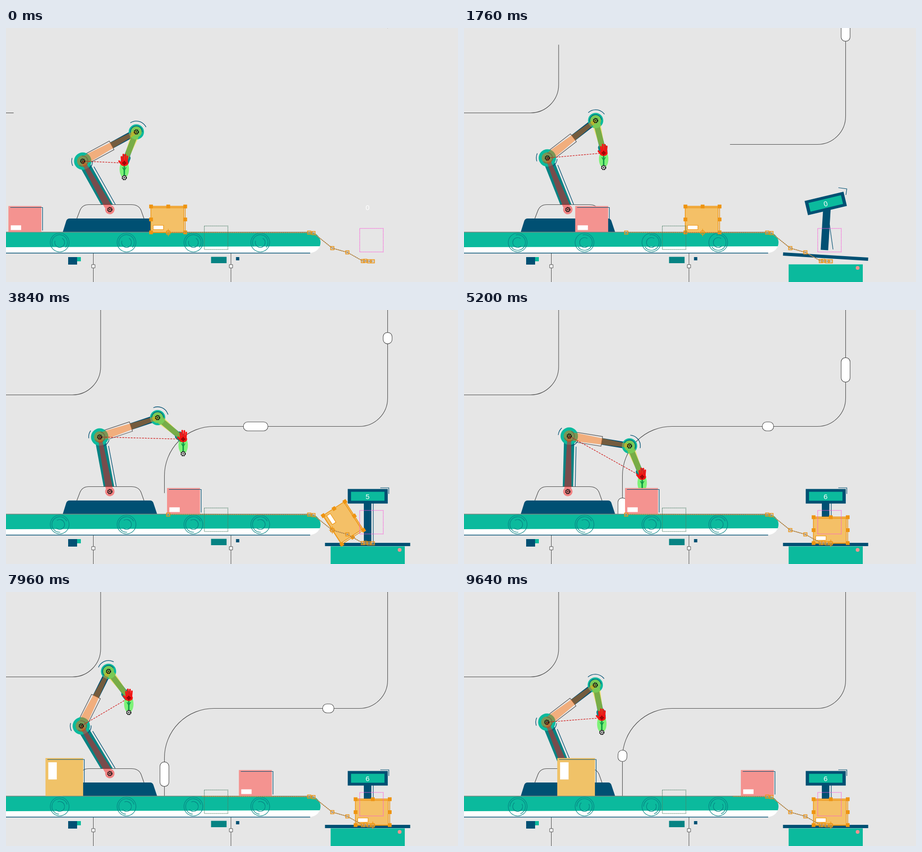
Animation of 960 by 540 pixels, one loop 9680 ms. Source, as an HTML page with a canvas:

```html
<!DOCTYPE html>
<html lang="en">
<head>
<meta charset="utf-8">
<title>Conveyor</title>
<style>
  html, body { margin: 0; width: 100%; height: 100%; overflow: hidden; background: #e6e6e6; }
  canvas { display: block; }
</style>
</head>
<body>
<canvas id="stage" width="960" height="540"></canvas>
<script>
const LOOP = 9680;
const c = document.getElementById('stage').getContext('2d');
const BG = '#e6e6e6', GREEN = '#0bba9d', TEAL = '#078383', NAVY = '#005073',
      PINK = '#f49390', YELLOW = '#f0c268', ORANGE = '#ee9411', INK = '#4a4a4a';
const RAD = Math.PI / 180, TAU = Math.PI * 2;

// ---- timing ----
const clamp = (v, a, b) => Math.max(a, Math.min(b, v));

function track(t, T, V, eased = true) {
  const n = T.length - 1;
  if (t <= T[0]) return V[0];
  if (t >= T[n]) return V[n];
  const i = T.findIndex(k => k > t) - 1, h = T[i + 1] - T[i], u = (t - T[i]) / h;
  if (!eased) return V[i] + (V[i + 1] - V[i]) * u;
  const slope = k => (V[k + 1] - V[k]) / (T[k + 1] - T[k]);
  const tangent = k => {
    if (k < 1 || k >= n) return 0;
    const a = slope(k - 1), b = slope(k);
    return a * b <= 0 ? 0 : 2 * a * b / (a + b);
  };
  const u2 = u * u, u3 = u2 * u;
  return (2 * u3 - 3 * u2 + 1) * V[i] + (u3 - 2 * u2 + u) * h * tangent(i)
       + (3 * u2 - 2 * u3) * V[i + 1] + (u3 - u2) * h * tangent(i + 1);
}

// ---- drawing helpers ----
function rect(x, y, w, h, fill) { c.fillStyle = fill; c.fillRect(x, y, w, h); }

function paint(fill, stroke, width = 1) {
  if (fill) { c.fillStyle = fill; c.fill(); }
  if (stroke) { c.strokeStyle = stroke; c.lineWidth = width; c.stroke(); }
}

function poly(points, stroke, width = 1, dash = []) {
  c.beginPath();
  points.forEach(p => c.lineTo(p[0], p[1]));
  c.setLineDash(dash);
  paint(null, stroke, width);
  c.setLineDash([]);
}

function arc(x, y, r, from, to, stroke, width = 1.2) {
  c.beginPath();
  c.arc(x, y, r, from * RAD, to * RAD);
  paint(null, stroke, width);
}

function disc(x, y, r, fill) {
  c.beginPath();
  c.arc(x, y, r, 0, TAU);
  paint(fill);
}

function local(x, y, deg, draw) {
  c.save();
  c.translate(x, y);
  c.rotate(deg * RAD);
  draw();
  c.restore();
}

const polar = (p, deg, r) => [p[0] + r * Math.cos(deg * RAD), p[1] + r * Math.sin(deg * RAD)];

// ---- pipes ----
const leftPipe = new Path2D('M0 180.5H141A60 60 0 0 0 201 120V0');
const rightPipe = new Path2D('M810.5 0V187.5A60 60 0 0 1 750.5 247.5H441.5A105 105 0 0 0 336.5 352.5V434');

function pipePoint(s) {
  if (s < 187.5) return [810.5, s, 90];
  if (s < 281.7) {
    const a = (s - 187.5) / 60 / RAD;
    return [...polar([750.5, 187.5], a, 60), a + 90];
  }
  if (s < 590.7) return [750.5 - (s - 281.7), 247.5, 180];
  if (s < 755.7) {
    const a = -90 - (s - 590.7) / 105 / RAD;
    return [...polar([441.5, 352.5], a, 105), a + 90];
  }
  return [336.5, 352.5 + s - 755.7, 90];
}

function pipes(t) {
  c.strokeStyle = INK;
  c.lineWidth = 1.1;
  const grow = (path, length) => {
    c.setLineDash([Math.max(0, length), 2000]);
    c.stroke(path);
    c.setLineDash([]);
  };
  const k = Math.min(t, 3900);
  grow(leftPipe, 16 + .222 * k - 2.8e-5 * k * k);
  const m = Math.min(t, 5500);
  grow(rightPipe, .3153 * m - 2.84e-5 * m * m);

  [1752, 3592, 4671, 6514].forEach((start, i) => {
    const s = (t - start) * .2403, w = i % 2 ? 24 : 52;
    if (s < -30 || s > 870) return;
    const [x, y, a] = pipePoint(s);
    local(x, y, a, () => {
      c.beginPath();
      c.roundRect(-w / 2, -9.5, w, 19, 9);
      paint('#fff', INK, 1.1);
    });
  });
}

// ---- conveyor ----
function conveyor(t) {
  c.save();
  c.beginPath();
  c.moveTo(0, 434);
  c.lineTo(646, 434);
  c.arc(646, 456, 22, -Math.PI / 2, Math.PI / 2);
  c.lineTo(0, 478);
  c.clip();
  rect(0, 434, 670, 45, '#fff');
  c.beginPath();
  c.moveTo(0, 434);
  c.lineTo(670, 434);
  c.lineTo(670, 464);
  c.lineTo(0, 466);
  paint(GREEN);
  c.restore();
  poly([[0, 434], [652, 434]], '#788880', 1.4);
  poly([[0, 478.5], [646, 478.5]], NAVY, 1.3);

  const spin = t * .0923 / 20 / RAD;
  for (let x = 114; x < 600; x += 142) {
    arc(x, 456, 20, 0, 360, TEAL);
    arc(x, 456, 16.5, spin + 150, spin + 400, TEAL);
    arc(x, 456, 10.5, spin - 60, spin + 200, TEAL);
  }

  rect(132, 487, 19, 16, NAVY);
  rect(151, 487, 8, 9, GREEN);
  rect(435.5, 486.5, 33, 13.5, TEAL);
  rect(488.5, 487, 7, 7, NAVY);
  [185.5, 477.8].forEach(x => {
    poly([[x, 479], [x, 540]], INK);
    c.beginPath();
    c.rect(x - 3.5, 503, 7, 7);
    paint('#fff', INK);
  });
}

// ---- robot arm ----
const POSE = [0, 1760, 3840, 5200, 6680, 7960, 9640];
const LOWER = [-119.2, -111.6, -100.5, -88.5, -104.5, -120.9, -112.2];
const UPPER = [-28.6, -37.8, -18.5, 9.3, -27.4, -63.5, -37.5];
const FORE = [111.1, 76.1, 40.1, 67.8, 63.3, 52.7, 78.7];

function bone(p, deg, len, r0, r1, fill) {
  local(...p, deg, () => {
    c.beginPath();
    c.arc(0, 0, r0, Math.PI / 2, Math.PI * 1.5);
    c.arc(0, 0, r0, -Math.PI / 2, -Math.PI / 4);
    c.lineTo(r0, -r0 * .75);
    c.lineTo(len, -r1);
    c.lineTo(len, r1);
    c.lineTo(r0, r0 * .75);
    c.arc(0, 0, r0, Math.PI / 4, Math.PI / 2);
    paint(fill);
  });
}

function marker([x, y], hollow) {
  if (hollow) disc(x, y, 5, '#fff');
  c.setLineDash([2.6, .8]);
  arc(x, y, 4.2, 0, 360, '#111', 2.6);
  c.setLineDash([]);
  disc(x, y, 1.4, '#111');
}

function hand([x, y]) {
  c.beginPath();
  c.ellipse(x, y + 13, 10, 18.5, 0, 0, TAU);
  paint('rgba(40,252,30,.55)');
  poly([[x, y + 6], [x, y + 30]], '#0c9a45', 3);
  poly([[x - 4, y + 9], [x, y + 16], [x + 4, y + 9]], '#0c9a45', 1.5);
  c.lineCap = 'round';
  [[-6, -13], [-2, -18], [2.5, -17.5], [6.5, -14]].forEach(([dx, dy]) =>
    poly([[x + dx * .8, y], [x + dx, y + dy]], '#f51414', 3.6));
  poly([[x - 5, y + 3], [x - 11, y - 4]], '#f51414', 3.6);
  c.lineCap = 'butt';
  c.beginPath();
  c.ellipse(x, y, 8.5, 6.5, 0, 0, TAU);
  paint('#f51414');
  arc(x, y, 3, 0, 360, '#600', 1);
  poly([[x - 5, y], [x + 5, y]], '#600');
  poly([[x, y - 5], [x, y + 5]], '#600');
}

function arm(t) {
  const a1 = track(t, POSE, LOWER), a2 = track(t, POSE, UPPER), a3 = track(t, POSE, FORE);
  const base = [220.5, 386], elbow = polar(base, a1, 118),
        top = polar(elbow, a2, 129.7), wrist = polar(top, a3, 71);

  local(...elbow, a1 + 180, () => {
    rect(0, -11, 112, 22, TEAL);
    poly([[22, -15], [114, -15.5]], NAVY, 1.3);
  });

  // housing
  c.beginPath();
  c.moveTo(150.5, 405);
  c.lineTo(157, 388);
  c.quadraticCurveTo(162, 375.5, 176, 375.5);
  c.lineTo(266, 375.5);
  c.quadraticCurveTo(282, 375.5, 287, 388);
  c.lineTo(293, 405);
  paint(BG, INK, 1.1);
  c.beginPath();
  c.moveTo(120.5, 434);
  c.lineTo(128, 410);
  c.quadraticCurveTo(130, 405, 135, 405);
  c.lineTo(306, 405);
  c.quadraticCurveTo(311, 405, 313, 410);
  c.lineTo(321, 434);
  paint(NAVY);

  local(...elbow, a2, () => {
    rect(60, -7, 70, 14, NAVY);
    c.beginPath();
    c.rect(12, -10.5, 58, 21);
    paint(BG, INK, 1.1);
  });
  local(...top, a3, () => rect(8, -6, 58, 12, TEAL));
  local(...wrist, a3, () => {
    c.beginPath();
    c.roundRect(-18, -9, 20, 18, 5);
    paint(TEAL);
  });

  disc(...elbow, 18.5, GREEN);
  arc(...elbow, 23.5, a1 + 274, a1 + 316, NAVY, 1.3);
  arc(...elbow, 21, a1 + 118, a1 + 168, NAVY, 1.3);
  arc(...elbow, 11, a1 + 20, a1 + 250, NAVY);
  disc(...top, 16.2, GREEN);
  arc(...top, 23, a2 - 95, a2 + 2, NAVY, 1.3);
  arc(...top, 12.5, a2 - 160, a2 + 30, NAVY);

  bone(base, a1, 118, 10, 4, 'rgba(252,13,13,.46)');
  bone(elbow, a2, 129.7, 12, 4, 'rgba(252,108,0,.46)');
  bone(top, a3, 71, 11.5, 4, 'rgba(252,220,0,.46)');
  poly([elbow, wrist], '#d01515', 1.2, [4, 2]);
  hand(wrist);
  [base, elbow, top].forEach(p => marker(p));
  marker([wrist[0], wrist[1] + 31], true);
}

// ---- boxes ----
function crate(x, y, w, h, fill, label) {
  rect(x, y, w, h, fill);
  rect(x + label[0], y + label[1], label[2], label[3], '#fff');
  poly([[x + 4, y + 3], [x + w + 2.5, y + 3], [x + w + 2.5, y + h - 3]], NAVY, 1.2);
}

function crates(t) {
  const pinkX = t < 5000
    ? Math.min(342, 5 + .1313 * t)
    : 342 + 246 * clamp((t - 5835) / 3165, 0, 1) ** 1.2;
  crate(pinkX, 378.5, 70, 55, PINK, [5, 41, 22, 10]);
  crate(.068 * t - 457.5, 353, 80, 80.5, YELLOW, [6, 9, 18, 36.5]);
}

// ---- selected box and its motion path ----
const NODES = [[344.5, 435], [644, 435], [653, 436], [693, 468], [725, 477],
               [758, 495.5], [763, 495], [771, 496], [779, 496]];
const STEP = [0, 3250, 3360, 3840, 4060, 4280, 4340, 4450, 4600];

function selection(t) {
  const x = track(t, STEP, NODES.map(p => p[0]), false);
  const y = track(t, STEP, NODES.map(p => p[1]), false);
  const turn = track(t, [3270, 3840, 4280], [0, 57, 0]);

  local(x, y, turn, () => {
    rect(-37, -56, 70, 55.5, '#f4c067');
    c.beginPath();
    c.rect(-37, -56, 70, 55.5);
    paint(null, ORANGE, 1.4);
    poly([[-34, -53], [36, -53], [36, 0], [-37, 0]], ORANGE, 1.6);
    c.beginPath();
    c.rect(-32, -15.5, 22, 9);
    paint('#fff', ORANGE, 1.2);
    [[-36.5, -55.5], [0, -55.5], [36, -55.5], [-36.5, -28], [36, -28], [-36.5, -.5], [36, -.5]]
      .forEach(([hx, hy]) => rect(hx - 4, hy - 4, 8, 8, ORANGE));
  });

  const past = Math.max(0, t - 7191);
  const line = [[NODES[0][0] + .0923 * past, 434.5], ...NODES.slice(1)];
  poly(line, '#eda23c', 1.4);
  poly(line, '#7a7468', 1.6, [2, 2]);
  NODES.slice(past ? 1 : 0).forEach(([nx, ny]) => {
    c.beginPath();
    c.rect(nx - 3.5, ny - 3.5, 7, 7);
    paint(null, ORANGE, 1.6);
    c.beginPath();
    c.rect(nx - 1.8, ny - 1.8, 3.6, 3.6);
    paint(null, '#aaa', .8);
  });

  arc(x, y, 4.2, 0, 360, ORANGE, 1.6);
  poly([[x - 7, y], [x + 7, y]], ORANGE, 1.2);
  poly([[x, y - 8], [x, y + 8]], ORANGE, 1.2);
}

// ---- weighing scale ----
function scale(t) {
  const rise = track(t, [1200, 1760, 2400], [180, -23, 0]);
  const fade = track(t, [1760, 2400], [1, 0]);
  const plateY = track(t, [1200, 1760, 1960], [70, -12.5, 0]);
  const tilt = track(t, [1200, 1760, 1960], [10, 3.5, 0]);

  local(768, 453 + rise, 3.5 * fade, () => rect(-8, -45, 16, 87, NAVY));
  local(780, 453 + rise + 14 * fade, -8 * fade, () => poly([[0, -42 + 15 * fade], [0, 42 - 15 * fade]], NAVY, 1.2));
  local(768.3, 396 + rise, -13.5 * fade, () => {
    rect(-42.5, -15.5, 85, 31, NAVY);
    rect(-35.5, -9.5, 71, 19, GREEN);
  });
  local(813, 378 + rise - 13 * fade, 8 * fade, () => poly([[-18, 0], [0, 0], [0, 13]], NAVY, 1.2));
  local(768, 498.5 + plateY, tilt, () => rect(-90.5, -3.5, 181, 7, NAVY));
  const baseY = track(t, [1100, 1500], [45, 0]);
  rect(689.5, 502.5 + baseY, 157.5, 60, GREEN);
  disc(836, 510 + baseY, 4, PINK);

  const textY = track(t, [1200, 1760, 2400], [-15, -23, 0]);
  local(768, 396.5 + textY, -13.5 * track(t, [1200, 1760, 2400], [0, 1, 0]), () => {
    c.fillStyle = '#fff';
    c.font = '15px "Liberation Sans", Arial, sans-serif';
    c.textAlign = 'center';
    c.fillText(Math.floor(clamp((t - 3320) / 100, 0, 6)), 0, 5.3);
  });
}

function dotted(x, y, color) {
  c.setLineDash([1.6, 1]);
  c.beginPath();
  c.rect(x, y, 50, 50);
  paint(null, color, 1.3);
  c.setLineDash([]);
}

function frame() {
  const t = performance.now() % LOOP;
  rect(0, 0, 960, 540, BG);
  pipes(t);
  arm(t);
  conveyor(t);
  crates(t);
  scale(t);
  selection(t);
  dotted(421.3, 420.8, '#4d8068');
  dotted(751.3, 426.2, '#f957d8');
  requestAnimationFrame(frame);
}
frame();
</script>
</body>
</html>
```
